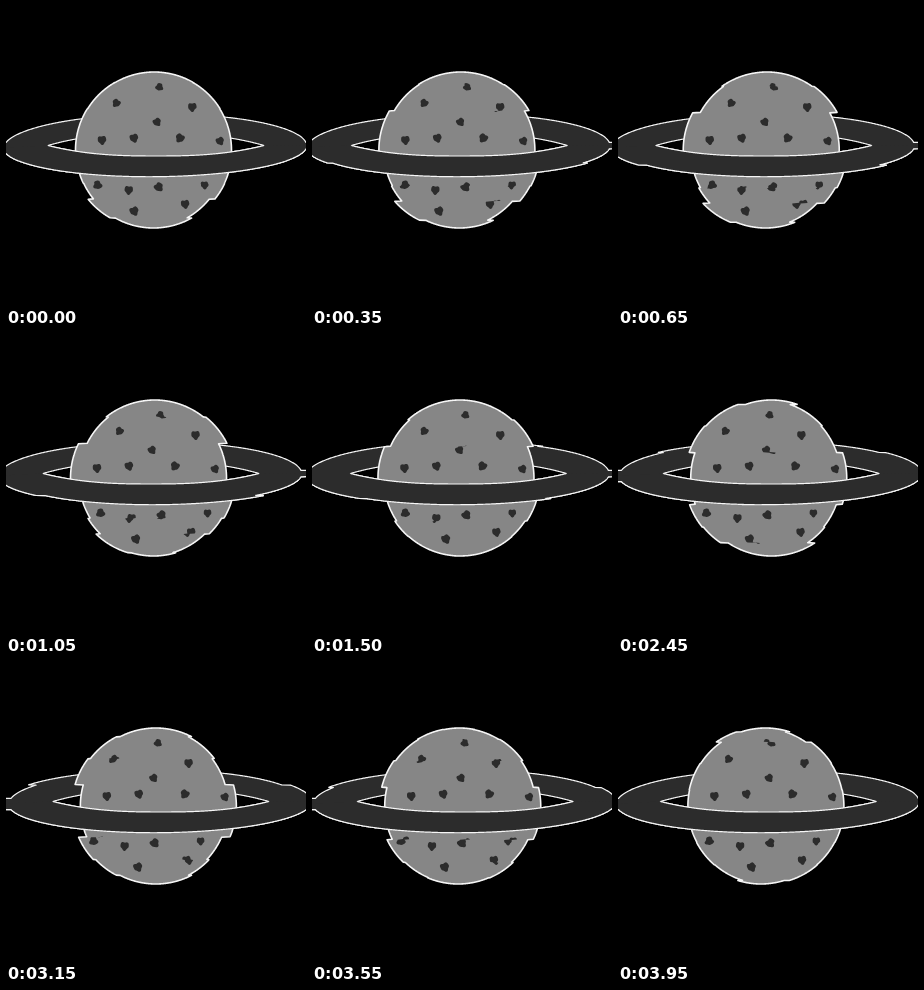
Recreate the animation shown at these times as an HTML page. Size 300 by 300 pixels, loop 4000 ms.

```html
<!DOCTYPE html>
<html lang="en">
<head>
<meta charset="utf-8">
<title>Glitching planet</title>
<style>
  html, body { margin: 0; width: 100%; height: 100%; overflow: hidden; background: #000; }
  svg { display: block; width: 100vw; height: 100vh; }
  path { stroke-linejoin: round; }
  .ring, .crater { fill: #2c2c2c; }
  .planet { fill: #868686; }
  .edge { fill: none; }
  .outlined { stroke: #f6f6f6; stroke-width: 1.2; }
  .planet.outlined { stroke-width: 1.6; }
</style>
</head>
<body>
<svg id="stage" viewBox="0 0 300 300"></svg>
<script>
const LOOP = 4000, STEP = 50, TAU = Math.PI * 2;
const DRIFT = 25.7; // downward travel of the slices in one loop

// The picture is cut into slices that sway sideways, mirrored around the middle one.
const cuts = [44.6, 54.6, 76.2, 102.7, 154.8, 177.5, 193, 212];
const sways = [
  { amp: -5, lead: 0 },
  { amp: 3.6, lead: 0.1 },
  { amp: 1.5, lead: 0.5 },
  { amp: -6, lead: 0.94 },
  { amp: 0, lead: 0 }
];

function makeShift(phase) {
  const offsets = sways.map(({ amp, lead }) => amp * Math.sin(TAU * phase + lead));
  const middle = cuts.length / 2;
  return y => {
    const slice = cuts.filter(cut => cut + DRIFT * phase <= y).length;
    return offsets[Math.abs(slice - middle)];
  };
}

function seededRandom(seed) {
  return () => {
    seed = (seed * 16807) % 2147483647;
    return seed / 2147483647;
  };
}

function sample(count, point) {
  return Array.from({ length: count + 1 }, (_, i) => point(i / count));
}

// The slightly tilted ring runs past the stage, so its cut ends continue sideways.
function ringPoint(angle) {
  const x = 149.2 + 151.5 * Math.cos(angle);
  const s = Math.sin(angle);
  const y = 141 + s * (s < 0 ? 33 : 29.7) + (150 - x) / 120;
  return [x < 0 ? -20 : x > 300 ? 320 : x, y];
}

function holePoint(u, depth) {
  return [150 + 108 * u, 139.5 + depth * (1 - Math.abs(u) ** 2.6)];
}

function craterOutline([x, y]) {
  const size = 3.7 + 0.7 * random();
  const wobble = random() * TAU;
  return sample(48, k => {
    const a = k * TAU;
    const r = size * (1 + 0.12 * Math.sin(3 * a + wobble) + 0.07 * Math.sin(5 * a + 2 * wobble));
    return [x + r * Math.cos(a), y + r * Math.sin(a)];
  });
}

const random = seededRandom(7);
const outer = sample(800, k => ringPoint(k * TAU));
const outerFront = sample(400, k => ringPoint(k * Math.PI));
const holeFront = sample(300, k => holePoint(2 * k - 1, 10.5));
const holeBack = sample(300, k => holePoint(1 - 2 * k, -12));
const globe = sample(900, k =>
  [147.5 + 78 * Math.cos(k * TAU), 144 + 78 * Math.sin(k * TAU)]);
const craters = [
  [153, 81], [110, 97], [186, 101], [151, 116],
  [96, 134], [128, 132], [174, 132], [214, 135],
  [91, 179], [122, 184], [152, 181], [198, 179],
  [133, 205], [184, 198]
].map(craterOutline);

const stage = document.getElementById('stage');
const layers = [];

function addLayer(className, ...lines) {
  const path = document.createElementNS('http://www.w3.org/2000/svg', 'path');
  path.setAttribute('class', className);
  path.setAttribute('fill-rule', 'evenodd');
  stage.append(path);
  layers.push({ path, lines, closed: !className.includes('edge') });
}

addLayer('ring outlined', outer, [...holeFront, ...holeBack]);
addLayer('planet outlined', globe);
addLayer('crater', ...craters);
addLayer('ring', [...outerFront, ...holeFront]);
addLayer('edge outlined', outerFront, holeFront);

function toPath(points, shift, closed) {
  const coords = points.map(([x, y]) => (x + shift(y)).toFixed(2) + ',' + y.toFixed(2));
  return 'M' + coords.join('L') + (closed ? 'Z' : '');
}

function render(time) {
  const t = Math.floor((time % LOOP) / STEP) * STEP;
  const shift = makeShift(t / LOOP);
  for (const { path, lines, closed } of layers) {
    path.setAttribute('d', lines.map(line => toPath(line, shift, closed)).join(''));
  }
}

let start;
function tick(now) {
  start ??= now;
  render(now - start);
  requestAnimationFrame(tick);
}
render(0);
requestAnimationFrame(tick);
</script>
</body>
</html>
```
